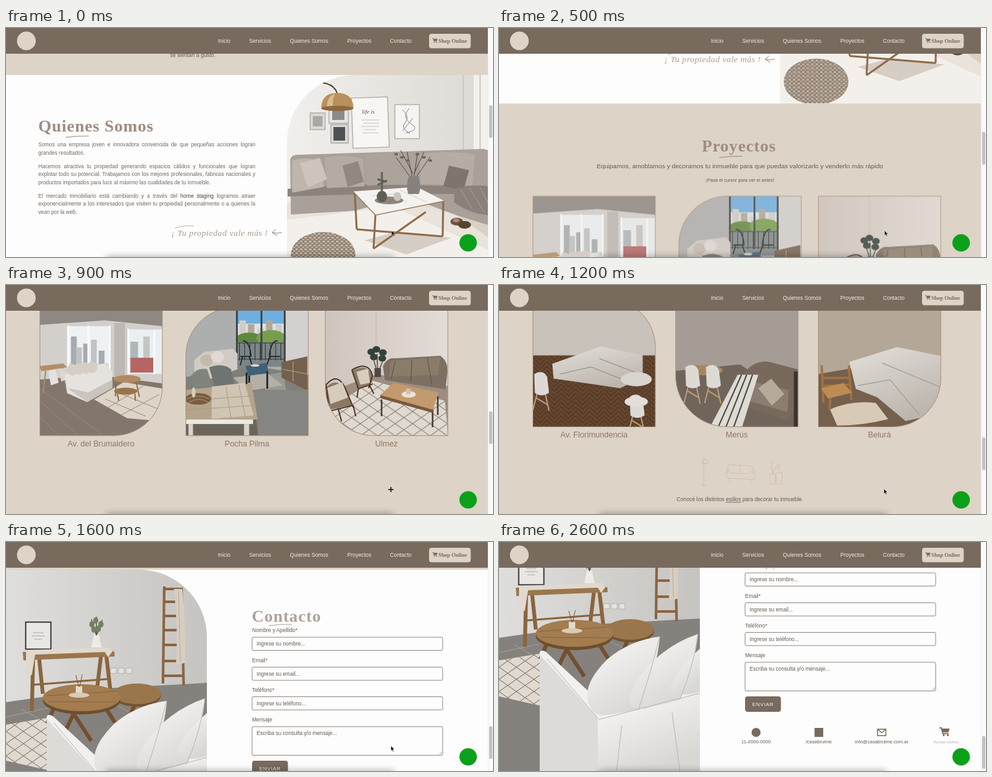
Recreate the animation shown at these times as an HTML page. Size 754 px wide and 356 px high, loop 3200 ms.

```html
<!DOCTYPE html>
<html lang="es">
<head>
<meta charset="utf-8">
<title>Interiores</title>
<style>
html, body { margin: 0; width: 100%; height: 100%; overflow: hidden; background: #fdfdfd }
svg { display: block; width: 754px; height: 356px; font-family: "Liberation Sans", Arial, sans-serif }
.serif { font-family: "Liberation Serif", serif; font-weight: bold }
.title { letter-spacing: .8px }
.script { font-family: "Liberation Serif", serif; font-style: italic }
.copy { font-size: 8.2px; line-height: 12.5px; color: #74675e; white-space: nowrap }
.copy p { margin: 0 0 8.5px }
.copy div { text-align-last: justify }
.copy div:last-child { text-align-last: left }
.copy b { font-weight: normal; color: #4c4037 }
</style>
</head>
<body>
<svg viewBox="0 0 754 356" id="stage"></svg>
<script>
const BROWN = '#796a5e', BEIGE = '#ddd3c7', WOOD = '#9a764c', INK = '#685b51', CAPTION = '#8f7767';
const stage = document.getElementById('stage');

const rect = (x, y, w, h, fill, extra = '') =>
  `<rect x="${x}" y="${y}" width="${w}" height="${h}" fill="${fill}" ${extra}/>`;
const shape = (fill, d) => `<path fill="${fill}" d="M${d}z"/>`;
const line = (stroke, width, d) =>
  `<path fill="none" stroke="${stroke}" stroke-width="${width}" d="M${d}"/>`;
const oval = (x, y, rx, ry, fill) =>
  `<ellipse cx="${x}" cy="${y}" rx="${rx}" ry="${ry}" fill="${fill}"/>`;
const text = (x, y, str, size, fill = INK, extra = '') =>
  `<text x="${x}" y="${y}" font-size="${size}" fill="${fill}" ${extra}>${str}</text>`;
const centred = (x, y, str, size, fill) => text(x, y, str, size, fill, 'text-anchor="middle"');
const group = (x, y, art) => `<g transform="translate(${x} ${y})">${art}</g>`;
const title = (x, y, str) => text(x, y, str, 26, '#9f8c80', 'class="serif title"');
const swash = (x, y) => line('#a08b7d', 1, `${x} ${y}q18-2.5 36-2`);

// Rectangle with its own radius at each corner, clockwise from top left
const arch = (w, h, [a, b, c, d]) =>
  `M${a} 0H${w - b}a${b} ${b} 0 0 1 ${b} ${b}V${h - c}a${c} ${c} 0 0 1 ${-c} ${c}` +
  `H${d}a${d} ${d} 0 0 1 ${-d} ${-d}V${a}a${a} ${a} 0 0 1 ${a} ${-a}z`;
let clips = 0;
function picture(x, y, w, h, radii, art, border = 'none') {
  const d = arch(w, h, radii), id = 'clip' + clips++;
  return group(x, y, `<clipPath id="${id}"><path d="${d}"/></clipPath>
    <g clip-path="url(#${id})">${art}</g><path d="${d}" fill="none" stroke="${border}"/>`);
}
const card = (x, y, radii, art, caption) => picture(x, y, 189.5, 199, radii, art, '#a98f7c') +
  centred(x + 94.5, y + 216, caption, 12.3, CAPTION);

const cart = (x, y, s) => `<g transform="translate(${x} ${y}) scale(${s})">` +
  line(BROWN, 1.3, '0 1h2l2 7h7') + shape(BROWN, '2.6 2H12L10.6 6.6H4z') +
  oval(5, 10, 1.1, 1.1, BROWN) + oval(10, 10, 1.1, 1.1, BROWN) + '</g>';

const defs = `<defs>
  <pattern id="rug" width="27" height="19" patternUnits="userSpaceOnUse">${rect(0, 0, 27, 19, '#e0d9d0')}
    ${line('#5d554f', .9, '0 9.5 13.5 0 27 9.5 13.5 19z')}</pattern>
  <pattern id="knit" width="7" height="6" patternUnits="userSpaceOnUse">${rect(0, 0, 7, 6, '#8f8071')}
    ${oval(2, 2, 2.2, 1.5, '#c8bbad')}${oval(5.5, 5, 2.2, 1.5, '#bdafa1')}</pattern>
  <pattern id="parquet" width="22" height="14" patternUnits="userSpaceOnUse">${rect(0, 0, 22, 14, '#65462f')}
    ${line('#4c3222', 1.2, '0 0 11 11 22 0M0 7 11 18 22 7M0-7 11 4 22-7')}</pattern>
  <linearGradient id="wall"><stop stop-color="#f1efec"/><stop offset="1" stop-color="#ddd9d4"/></linearGradient>
  <linearGradient id="plaster"><stop stop-color="#dfdedc"/><stop offset="1" stop-color="#c6c4c0"/></linearGradient>
  <linearGradient id="nookwall"><stop stop-color="#cfc5bd"/><stop offset="1" stop-color="#e3dcd6"/></linearGradient>
  <linearGradient id="linen" x2=".5" y2="1"><stop stop-color="#fbfaf9"/><stop offset="1" stop-color="#d9d7d4"/></linearGradient>
  <linearGradient id="bedding" x2=".5" y2="1"><stop stop-color="#e3dfda"/><stop offset="1" stop-color="#bdb6ae"/></linearGradient>
</defs>`;

const frame = (x, y, w, h, fill) => rect(x, y, w, h, fill, 'stroke="#a9a39c" stroke-width="1.2"');
const livingRoom = rect(435, 73, 311, 314, 'url(#wall)') +
  rect(724, 73, 22, 190, '#f3f1ee') + line('#cfc9c2', 2, '708 73V250M734 73V260') +
  shape('#e9e3dc', '435 272 560 262 746 300V387H435z') + shape('#f3f0ec', '435 298 600 278 746 345V387H435') +
  shape('#d9cfc4', '690 285 746 290V325z') +
  frame(471, 132, 23, 26, '#dcd9d6') + frame(500, 122, 30, 26, '#e7e5e2') + frame(503, 150, 27, 29, '#d8d6d3') +
  rect(475, 137, 15, 16, '#aaa8a6') + rect(505, 128, 19, 15, '#8d8b8a') + rect(507, 154, 18, 21, '#4e5153') +
  `<g transform="rotate(-2 564 147)">${frame(536, 108, 56, 78, '#f7f6f4')}</g>` + frame(602, 119, 38, 53, '#f5f4f2') +
  text(551, 133, 'life is', 9, '#55504c', 'class="script"') +
  line('#b7b2ad', .8, '550 143h28M553 148h24M550 153h28M555 158h18M552 163h24') +
  line('#8b8884', 1, '614 127q12 12 4 20t7 17M624 125q-12 14 3 24t-8 14M630 140l-16 20') +
  line('#4b4036', 2, '490 85Q509 88 513 102') +
  shape('#b8905c', '488 124Q489 101 513 101T538 124Q513 132 488 124') +
  shape('#d9bd90', '497 122q0-15 12-20q-4 10-3 23') + oval(513, 125, 25, 4, '#8b6840') +
  // sofa
  shape('#a9a099', '440 204q3-8 13-7l287-9 6 2V306L700 292 620 262 540 284 441 290') +
  shape('#8c837c', '436 250 540 243 746 246V258L560 258 436 262') +
  shape('#beb5ad', '443 206q20-7 44 1l5 40-49 9') + shape('#b4aba3', '493 202q32-7 60 2l2 42-58 3') +
  shape('#aca39b', '556 198q40-8 77 0l2 43-76 4') + shape('#b5aca4', '640 197q40-8 86 0l-4 48-80-3') +
  shape('#cdc4bc', '455 210l31-8 11 33-30 13') + shape('#928880', '521 214l24-7 9 32-25 8') +
  shape('#7f756e', '686 214l31 7-9 32-31-7') + shape('#8b817a', '694 250q30-8 52-4v45q-30-3-52-20') +
  line('#aaa19a', 1, '704 251 722 282M718 249 740 286M734 248 746 272') +
  oval(491, 353, 50, 36, 'url(#knit)') +
  // coffee table
  shape('#d6cdc4', '555 330 600 318 690 326 620 352') +
  line('#8d6c49', 3, '540 257 543 313M572 290 569 343M677 270 676 324M569 343 650 286M543 313 676 324') +
  shape('#f4f2ef', '538 254 636 247 679 269 572 291') + line('#9e805d', 1.6, '538 255 572 291 679 269') +
  line('#d2cdc8', 1, '566 261l34-3 20 13M610 252l40 18') +
  oval(593, 268, 22, 6, '#8d857c') + oval(582, 262, 8, 9, '#615d55') + oval(606, 262, 6, 7, '#cdc6bd') +
  line('#5b6255', 3, '582 254v-30M575 244l15-7M575 235l14 4') +
  line('#54473e', 1, '629 236 604 201M630 236 621 193M631 236 637 195M632 236 657 200M630 226 611 190M632 226 647 193') +
  [604, 613, 622, 637, 647, 657].map((x, i) => oval(x, 196 + i % 3 * 5, 3, 2, '#776459')).join('') +
  shape('#86817c', '624 230h14q6 18 1 28h-16q-5-12 1-28') +
  oval(698, 301, 10, 6, '#6a5140') + oval(710, 306, 10, 6, '#59422f') + oval(697, 299, 5, 3, '#a98d76');

const loft = rect(0, 0, 190, 200, '#d3d0cc') + shape('#8e8883', '0 0H190V29L100 20 0 27') +
  shape('#83776d', '0 112 90 105 190 118V200H0') + line('#978b81', 1, '0 145 60 200M0 170 30 200M0 126 100 200') +
  rect(42, 29, 66, 58, '#eef2f5') + rect(137, 34, 53, 69, '#eaeff2') +
  [48, 56, 67, 79, 91].map((x, i) => rect(x, 45 + i * 17 % 23, 9, 45 - i * 17 % 23, i % 2 ? '#c0c2c3' : '#a5abaf')).join('') +
  rect(140, 53, 12, 27, '#b0b6ba') + rect(160, 45, 10, 34, '#c6c5c3') + rect(140, 78, 36, 23, '#b56563') +
  line('#fafafa', 3, '44 28V95M75 28V90M108 28V98M137 33V104M177 35V104') + rect(115, 24, 17, 88, '#bdb8b3') +
  shape('#b28e67', '0 91 36 87 42 93 2 99') + line('#a88a69', 2, '9 98 5 133M35 93 39 117') +
  shape('#e5e1dc', '13 99 24 96 29 117 17 121') + shape('#dcd6cf', '30 96 39 94 42 112 33 115') +
  shape('#ded5c9', '84 143 130 116 190 126V177L135 172') +
  line('#8d8174', .9, '101 142 164 169M121 132 184 158M103 157 160 122M124 168 185 135') +
  shape('#e6e2dd', '38 105 58 92 101 87 112 99V125L73 147 42 133') + shape('#c9c4be', '42 125 75 132 112 112V125L73 147') +
  [50, 61, 71, 81].map(x => oval(x, 103 - x / 8, 8, 9, '#d5cec6')).join('') +
  line('#8f6d49', 2, '118 115 117 138M149 115 154 139M120 134 122 145M147 134 148 145') +
  oval(135, 111, 21, 6, '#b18a62') + oval(133, 130, 18, 5.5, '#9b734b');

const balcony = rect(0, 0, 190, 200, '#adaeae') + rect(153, 0, 37, 110, '#d2d1cf') +
  shape('#7e807b', '0 108 95 89 190 105V200H0') + shape('#979994', '125 105 151 100 165 200H115') +
  rect(79, 0, 74, 92, '#6faee0') + rect(79, 25, 74, 23, '#dbe2e5') +
  [83, 96, 111, 124, 139].map((x, i) => rect(x, 20 + i % 3 * 6, 10, 32, i % 2 ? '#b5a797' : '#d0cdc8')).join('') +
  oval(98, 49, 21, 10, '#61883f') + oval(132, 47, 23, 12, '#779e4d') + rect(79, 54, 74, 38, '#7b8586') +
  line('#303536', 1, '79 55H153M79 80H153' + [83, 91, 99, 107, 115, 123, 131, 139, 147].map(x => `M${x} 55V82`).join('')) +
  line('#25292a', 1.8, '88 52q10-2 13 24M101 76H84M98 76l5 15M88 76l-4 14M142 52q-10-2-13 24M129 76h17M130 76l-5 14') +
  line('#45494a', 3, '79 0V94M117 0V82M153 0V94') +
  shape('#d0cbc4', '13 82 28 69 73 64 80 72V96L29 114 13 107') + oval(32, 82, 10, 9, '#c4b9ad') + oval(49, 77, 10, 9, '#e0dad3') +
  shape('#b6afa4', '73 109 126 102 150 121 95 130') + shape('#3f6076', '92 91 125 86 128 102 97 106') +
  line('#263136', 3, '94 101V128M126 99V126M98 106V117') + oval(107, 90, 7, 2, '#ddd7ca') +
  shape('#74604c', '148 85 188 76V129L148 109') + line('#bba88f', 1, '150 96 187 103M166 84V115') +
  shape('#80847f', '8 106q10-14 25-10l8 25-30 4') + shape('#6f7473', '36 93q20-8 34 3l5 25-30 3') +
  // dining table
  shape('#6b655b', '0 128 190 128V200H0') + shape('#858681', '104 128H190V200H112') +
  shape('#b5a48c', '0 128 102 118 111 174 0 176') + shape('#d0c5b3', '40 123 91 117 105 168 40 173') +
  line('#aa9a82', 1, '0 145 105 137M0 159 108 152M62 123 70 173M82 120 92 170') +
  rect(0, 174, 104, 7, '#ece9e1') + rect(4, 181, 7, 19, '#d8d4cc') + rect(90, 181, 8, 19, '#d8d4cc') +
  oval(19, 142, 20, 9, '#795d42') + line('#b5926f', 1, '2 142q17-9 34 0M5 147q16-9 29 0') + oval(12, 132, 3, 8, '#d8cdbc');

const nook = rect(0, 0, 190, 200, 'url(#nookwall)') + rect(78, 0, 1, 105, '#c1b7ae') +
  shape('#9d8d80', '0 132 80 104 190 122V200H0') + shape('url(#rug)', '0 160 74 114 185 145 190 200H0') +
  shape('#7d7063', '89 91q7-14 19-12l70-4q12 8 11 25l-3 27-94-14') + shape('#8b7c6a', '101 83 178 77 174 105 99 107') +
  line('#62574a', 1.2, '108 83 102 111M134 81 132 115M158 79 165 121') +
  line('#39463a', 1.3, '81 103 72 72M81 103 80 72M81 103 92 75') +
  [[71, 69], [79, 65], [89, 70], [75, 77], [88, 79]].map(([x, y]) => oval(x, y, 6, 5, '#32423a')).join('') +
  rect(76, 94, 10, 14, '#4f4943') +
  shape('#8c7866', '1 124Q19 106 31 130L41 152 6 159') + shape('#8c7866', '42 98Q66 86 72 106L70 120 51 124') +
  line('#4d3525', 2, '1 120Q19 99 31 126L43 155M1 120 6 161 43 152M20 158 25 177M43 152 47 169M41 97Q67 82 73 106L67 125M41 97 51 126 73 119M51 126 49 140M68 120 75 134') +
  shape('#d7cbbd', '3 125 26 116 35 140 8 150') + shape('#d8ccc0', '48 100 66 95 69 117 54 120') +
  line('#47372d', 2.4, '87 143V169M166 157V186M174 138V167') +
  shape('#c39a6e', '85 136 105 117 175 132 167 159') + shape('#79583c', '85 136 167 159V164L85 141') +
  oval(129, 135, 11, 5, '#e9e4dd') + rect(125, 126, 7, 9, '#d3c2ad');

const whiteChair = (x, y) => group(x, y, line('#bc9b75', 2, '5 20-2 48M17 22 23 49M3 29 21 40') +
  shape('#dddad6', '0-8q13-8 20 4l3 25q-12 8-22 0'));
const bedroom = rect(0, 0, 190, 200, '#c8c2bb') + rect(0, 88, 190, 112, 'url(#parquet)') +
  shape('url(#bedding)', '30 101 105 74 170 88V122L135 139 95 133 32 124') +
  line('#9d968e', 1.2, '42 117 90 106 150 130M103 93 165 117') +
  whiteChair(2, 125) + whiteChair(150, 160) + oval(160, 125, 24, 11, '#d8d4cf') + oval(160, 160, 18, 8, '#e2dfdb');
const lounge = rect(0, 0, 190, 200, '#a59d95') + shape('#71655b', '0 112 100 102 190 165V200H0') +
  oval(44, 111, 29, 8, '#a78663') + whiteChair(15, 114) + whiteChair(47, 114) +
  shape('#78695c', '108 113q15-18 37-15l45 12v61l-19 18-60-21') + shape('#8b7d70', '112 127l63 15-2 34-62-18') +
  shape('#b6aa9c', '128 139l20-15 20 24-19 18') +
  shape('#dedad4', '55 196 96 118 128 118 103 199H55') +
  line('#4a4642', 2, '66 199 102 118M78 199 110 118M90 199 119 118') + rect(183, 113, 7, 86, '#3b342e');
const guestRoom = rect(0, 0, 190, 200, '#b5a798') + shape('#75604e', '0 117 75 104 190 183V200H0') +
  shape('url(#bedding)', '48 98 122 75 190 89V178L135 190 91 153 58 140') +
  line('#a29b93', 1.2, '61 135 111 126 157 181M99 100 190 138') +
  shape('#d9cab5', '18 172q33-15 71-10l19 25q-39 10-79 10') +
  line('#a3723f', 3.5, '5 103 8 162M47 104 51 157M7 123H48M7 136 50 133M19 150 17 172') + shape('#bb8c53', '4 139 39 131 52 146 15 155');

const home = rect(0, 43, 311, 413, 'url(#plaster)') + shape('#85817d', '0 249 145 228 311 219V456H0') +
  line('#a4a09c', 1, '0 272 170 235M24 260 95 300M130 232 230 285') +
  rect(30.5, 124.5, 39, 42, '#e8e7e4', 'stroke="#2d2c2b" stroke-width="1.8"') + line('#aaa', 1, '42 141h16M40 146h20M44 151h12') +
  line('#8a6540', 4, '245 69 243 220M272 71 275 223') +
  [73, 93, 115, 137, 160, 185, 208].map(y => line('#8a6540', 4, `245 ${y}h28`)).join('') +
  shape('#d7cec1', '260 73h13q5 49 4 115l-14 3q4-51-3-118') + line('#b6aa9c', 1, '267 76l3 110') +
  [162, 174, 186].map(x => rect(x, 196, 9, 8, '#e5e4e2', 'stroke="#999" stroke-width=".6"')).join('') +
  line('#8a653f', 6, '42 180 40 263M155 174 164 251M51 178 57 236M147 177 141 228') + line('#8a653f', 3, '42 222 158 213') +
  shape(WOOD, '26 171 157 165 168 171V178L27 184') + shape('#e1d9ce', '31 168 160 164 165 170 158 179 153 171 45 175 40 207 31 204') +
  shape('#eeeae4', '136 144h8l4 20h-16') + line('#526449', 1.5, '140 145 132 120M140 145V116M140 145 149 121') +
  [[133, 128], [139, 122], [147, 128], [143, 135], [136, 136]].map(([x, y]) => oval(x, y, 4, 5, '#738064')).join('') +
  shape('url(#rug)', '0 284 66 273 94 340 62 354 0 340') +
  line('#72502f', 6, '77 251 64 282M108 260 88 302M99 258 132 309M151 253 169 281M202 246 192 270M228 245 239 271') +
  oval(203, 239, 37, 17, '#755330') + oval(203, 236, 37, 16, WOOD) +
  oval(117, 246, 60, 22, '#6f4d2c') + oval(117, 242, 60, 21, '#a37c50') + line('#7f5d38', .8, '62 239 170 232M65 248 171 249') +
  rect(108, 224, 10, 16, '#e3dacb') + oval(113, 238, 16, 4, '#d8cbb6') + line('#75573b', 1, '113 225 108 207M114 225 118 206') +
  shape('#f1f0ee', '63 271Q67 266 74 272L160 352 311 317V456H63') + shape('#dddbd8', '63 275 153 374V456H63') +
  shape('url(#linen)', '153 375 311 334V456H153') +
  shape('url(#linen)', '249 247Q202 253 168 282 133 317 137 343 140 367 160 370 191 365 216 361 245 299 249 247') +
  shape('url(#linen)', '308 243Q253 262 220 307 203 328 202 351 212 365 237 356L280 345Q304 290 308 243') +
  shape('url(#linen)', '311 266Q276 296 265 327 274 344 311 333') +
  line('#b9b6b2', 1, '249 247Q235 303 216 361M308 243Q302 292 280 345M154 376 311 335M153 374 74 281M190 385l-8 71M268 365l12 91');

const copy = [
  ['Somos una empresa joven e innovadora convencida de que pequeñas acciones logran', 'grandes resultados.'],
  ['Hacemos atractiva tu propiedad generando espacios cálidos y funcionales que logran',
    'explotar todo su potencial. Trabajamos con los mejores profesionales, fabricas nacionales y',
    'productos importados para lucir al máximo las cualidades de tu inmueble.'],
  ['El mercado inmobiliario está cambiando y a través del <b>home staging</b> logramos atraer',
    'exponencialmente a los interesados que visiten tu propiedad personalmente o a quienes la', 'vean por la web.']
].map(lines => `<section><div>${lines.join('</div><div>')}</div></section>`)
  .join('<div style="height:8.5px"></div>');

const about = rect(0, -40, 746, 113, BEIGE) + text(254, 45, 'se sientan a gusto.', 8.4) +
  title(50, 160.5, 'Quienes Somos') + swash(92, 170) +
  `<foreignObject x="50" y="176" width="336" height="130"><div class="copy">${copy}</div></foreignObject>` +
  text(256, 323, '¡ Tu propiedad vale más !', 13.5, '#b09a8c', 'class="script" letter-spacing=".4"') +
  line('#b09a8c', .8, '262 311q14-5 29-3') + line('#9b877a', 1, '427 318q-8 2-15 0l6-5M412 318l8 5') +
  picture(435, 73, 311, 314, [105, 0, 0, 0], group(-435, -73, livingRoom));

const lineArt = line('#c9bbad', .7,
  '313 1070h9M317 1070V1031q0-3 3-2M316 1029l7 2v6l-9-2z' +
  'M354 1051v-10q1-4 5-3l30 2q5 0 4 5v7M352 1050q-2-5 2-5l4 6 30 1 4-6q5 0 4 5l-1 10-42-2zM356 1060v4M391 1061v4M373 1039v12' +
  'M419 1053h9l-1 15h-7zM429 1050h9v18h-9zM423 1053q1-11-2-20M424 1053q3-12 8-16M434 1050q-2-9 2-14M424 1046l-5-4M427 1043l7 0');
const projects = rect(0, 387, 746, 736, BEIGE) +
  `<g id="projects">${title(314, 461.5, 'Proyectos')}${swash(341, 471)}</g>` +
  centred(373, 487.6, 'Equipamos, amoblamos y decoramos tu inmueble para que puedas valorizarlo y venderlo más rápido', 9.88) +
  centred(373, 508.6, '¡Pasá el cursor para ver el antes!', 7.23) +
  `<g id="row1">${card(52.5, 531, [0, 0, 75, 0], loft, 'Av. del Brumaldero')}` +
  card(278.5, 531, [75, 0, 0, 0], balcony, 'Pocha Pilma') + card(494.5, 531, [0, 0, 0, 75], nook, 'Ulmez') + '</g>' +
  `<g id="row2">${card(52.5, 780, [0, 75, 0, 0], bedroom, 'Av. Florimundencia')}` +
  card(273.5, 780, [0, 0, 0, 80], lounge, 'Merús') + card(494.5, 780, [0, 0, 75, 0], guestRoom, 'Belurá') + '</g>' +
  lineArt + centred(373, 1095, 'Conocé los distintos <tspan text-decoration="underline">estilos</tspan> para decorar tu inmueble.', 8.26);

const field = (y, h, label, hint) => text(381, y - 8, label, 8.25) + text(388, y + 13, hint, 8.2) +
  rect(381, y, 295, h, 'none', `rx="2" stroke="${BROWN}" stroke-width=".8"`);
const contact = rect(0, 1123, 746, 420, '#fdfdfd') + picture(0, 1123, 311, 420, [0, 105, 0, 0], group(0, -43, home)) +
  `<g id="contact">${title(380.5, 1203.5, 'Contacto')}${swash(407, 1210)}</g>` +
  field(1228, 20.5, 'Nombre y Apellido*', 'Ingrese su nombre...') + field(1274.5, 20.5, 'Email*', 'Ingrese su email...') +
  field(1320.5, 20.5, 'Teléfono*', 'Ingrese su teléfono...') + field(1367, 44.5, 'Mensaje', 'Escriba su consulta y/o mensaje...') +
  line('#888', .7, '671 1410l4-4M673.5 1410l1.5-1.5') +
  rect(381, 1420, 55.5, 24, BROWN, 'rx="4"') + text(392, 1435, 'ENVIAR', 8.1, '#f3eee8', 'letter-spacing=".55"') +
  oval(398, 1476, 7, 7, BROWN) + rect(488.5, 1469, 13.5, 14, BROWN) +
  line(BROWN, 1.4, '586 1471h13v10h-13zl6.5 5.5 6.5-5.5') + cart(682, 1467.5, 1.3) +
  centred(398, 1492.5, '11-0000-0000', 7.45) + centred(495, 1492.5, '/casabrulme', 7.45) +
  centred(592.5, 1492.5, 'info@casabrulme.com.ar', 7.45) +
  text(672, 1493, 'Tienda Online', 7, '#b9aaa0', 'class="script"');

const nav = rect(0, 0, 746, 40, BROWN) + oval(31.5, 20, 14.5, 14.5, BEIGE) +
  [[328, 'Inicio'], [376.5, 'Servicios'], [439.5, 'Quienes Somos'], [528.5, 'Proyectos'], [594.5, 'Contacto']]
    .map(([x, s]) => text(x, 23, s, 8.35, '#efeae5')).join('') +
  rect(655, 9, 64.5, 22.5, BEIGE, 'rx="4"') + cart(660, 15.5, .68) + text(669.5, 23, 'Shop Online', 8.4, BROWN, 'class="serif"');

stage.innerHTML = defs + rect(0, 0, 754, 356, '#fdfdfd') + `<g id="page">${about}${projects}${contact}</g>` +
  rect(155, 354, 445, 12, '#000', 'opacity=".25" style="filter:blur(5px)"') + nav +
  rect(746, 0, 8, 356, '#fafafa') + rect(746, 0, .6, 356, '#e6e6e6') + rect(748, 0, 5, 51, '#c1c1c1', 'rx="2.5" id="thumb"') +
  oval(715.5, 334, 13.5, 13.5, '#0ba01a') +
  `<path id="arrow" d="M597 315v7.6l1.8-1.6 1.3 2.8 1.2-.6-1.3-2.7h2.4z" fill="#111" stroke="#fff" stroke-width=".4"/>
  <path id="cross" d="M596 314v8M592 318h8" stroke="#111" stroke-width="1.5"/>`;

const part = id => document.getElementById(id);
const [page, thumb, arrow, cross] = ['page', 'thumb', 'arrow', 'cross'].map(part);
const progress = (t, start, length) => Math.min(1, Math.max(0, (t - start) / length));

// Scroll gestures: start, length, distance, ease-out power
const glides = [[0, 700, 273, 3.5], [700, 700, 582, 1.435], [1400, 1000, 325, 5.28]];
const reveals = [['projects', 250], ['row1', 300], ['row2', 950], ['contact', 1400]]
  .map(([id, start]) => [part(id), start]);

function draw() {
  const t = Math.floor(performance.now() % 3200 / 100) * 100;
  const scroll = glides.reduce((sum, [start, length, distance, power]) =>
    sum + distance * (1 - (1 - progress(t, start, length)) ** power), 0);
  page.setAttribute('transform', `translate(0 ${-scroll})`);
  thumb.setAttribute('y', 120 + scroll / 6.5);
  for (const [el, start] of reveals) el.setAttribute('opacity', progress(t, start, 250));
  const moving = t >= 800 && t < 1100;
  arrow.setAttribute('opacity', moving || t >= 2500 ? 0 : 1);
  arrow.setAttribute('transform', t < 800 ? '' : 'translate(-1 2)');
  cross.setAttribute('opacity', moving ? 1 : 0);
  requestAnimationFrame(draw);
}
draw();
</script>
</body>
</html>
```
